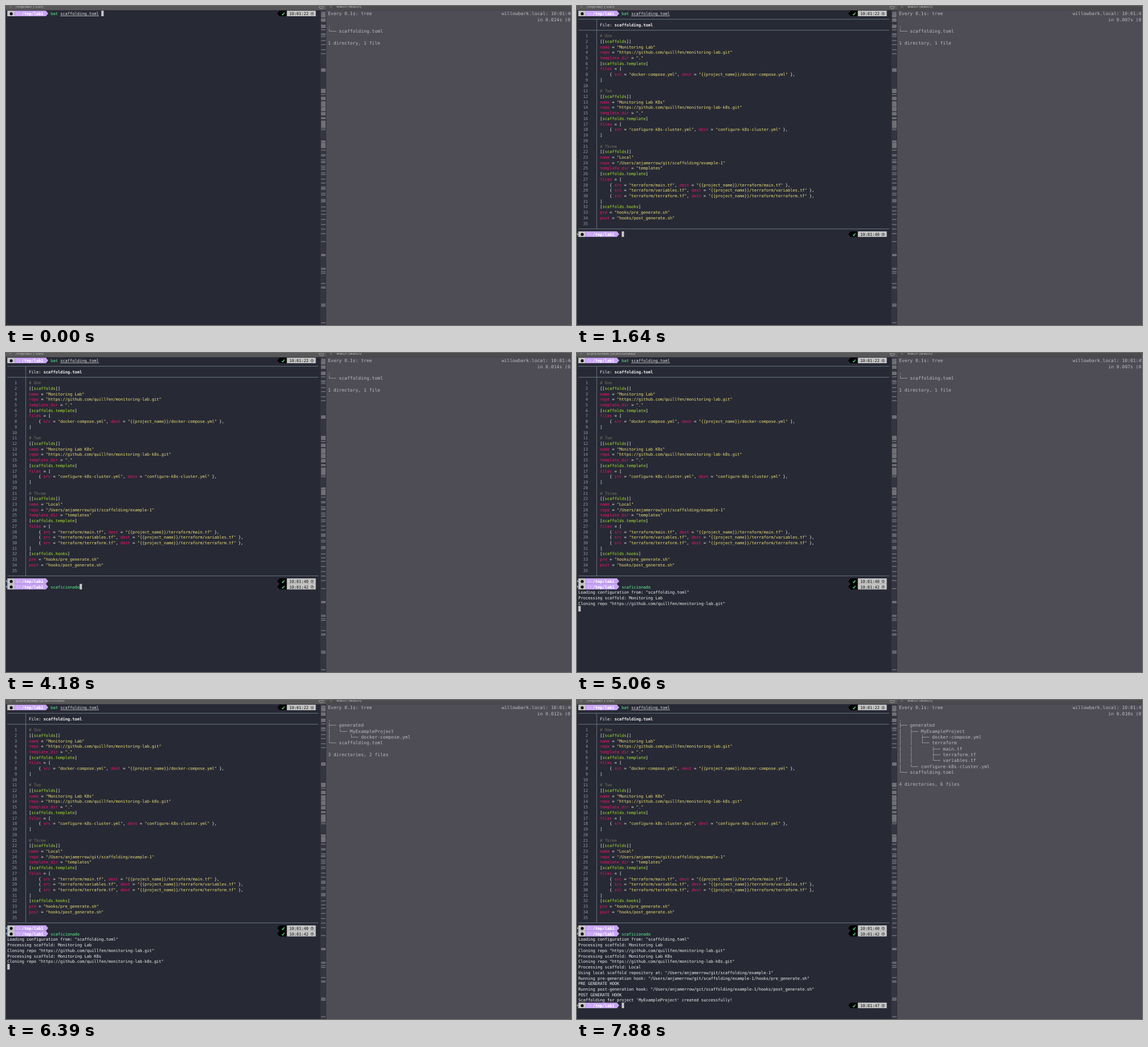
Animation of 997 by 562 pixels, one loop 8000 ms. Source, as an HTML page:

```html
<!DOCTYPE html>
<html lang="en">
<head>
<meta charset="utf-8">
<title>Scaffolding terminal</title>
<style>
html, body { margin: 0; width: 100%; height: 100%; overflow: hidden; background: #272935; }
svg { display: block; width: 997px; height: 562px; }
text { white-space: pre; text-rendering: geometricPrecision; }
.mono { font: 7.29px "DejaVu Sans Mono", monospace; letter-spacing: -.1365px; fill: #eeeeec; }
.watch { font: 7.9px "DejaVu Sans Mono", monospace; letter-spacing: .104px; }
.title { font: 6.6px Inter, sans-serif; fill: #c4c4c4; }
.bold { font-weight: bold; }
</style>
</head>
<body>
<svg viewBox="0 0 997 562">
  <rect width="997" height="562" fill="#272935"/>
  <rect x="565" width="432" height="562" fill="#4e4d55"/>
  <g id="marks"></g>
  <g id="file"></g>
  <g id="shell"></g>
  <g id="watch"></g>
  <g id="bars"></g>
</svg>
<script>
const LOOP = 8000;
const PT = .6075;                                            // one terminal point on the stage
const CW = 7 * PT, RH = 16 * PT, LEFT = 2.3, TOP = 8.28;     // left pane cells
const WW = 8 * PT, WH = 17 * PT, WLEFT = 568.2, WTOP = 8.4;  // right pane cells
const GREEN = "#5af08c", GREY = "#c6c6c6", PALE = "#bdbdc0";
const USER = "quillfen", HOME = "/Users/anjamerrow", HOST = "willowbark.local";

const at = id => document.getElementById(id);
const esc = s => s.replace(/&/g, "&amp;").replace(/</g, "&lt;");
const colX = c => LEFT + c * CW;
const rowY = r => TOP + r * RH;
const rect = (x, y, w, h, fill) => `<rect x="${x}" y="${y}" width="${w}" height="${h}" fill="${fill}"/>`;
const path = (d, attrs) => `<path d="${d}" ${attrs}/>`;
const span = (s, fill) => `<tspan fill="${fill}">${s}</tspan>`;
const raw = (c, r, body, cls = "") => `<text class="mono ${cls}" x="${colX(c)}" y="${rowY(r) + 7.95}">${body}</text>`;
const put = (c, r, s, fill = "#eeeeec", cls = "") => raw(c, r, span(esc(s), fill), cls);

const toml = `# One
[[scaffolds]]
name = "Monitoring Lab"
repo = "https://github.com/${USER}/monitoring-lab.git"
template_dir = "."
[scaffolds.template]
files = [
    { src = "docker-compose.yml", dest = "{{project_name}}/docker-compose.yml" },
]

# Two
[[scaffolds]]
name = "Monitoring Lab K8s"
repo = "https://github.com/${USER}/monitoring-lab-k8s.git"
template_dir = "."
[scaffolds.template]
files = [
    { src = "configure-k8s-cluster.yml", dest = "configure-k8s-cluster.yml" },
]

# Three
[[scaffolds]]
name = "Local"
repo = "${HOME}/git/scaffolding/example-1"
template_dir = "templates"
[scaffolds.template]
files = [
    { src = "terraform/main.tf", dest = "{{project_name}}/terraform/main.tf" },
    { src = "terraform/variables.tf", dest = "{{project_name}}/terraform/variables.tf" },
    { src = "terraform/terraform.tf", dest = "{{project_name}}/terraform/terraform.tf" },
]
[scaffolds.hooks]
pre = "hooks/pre_generate.sh"
post = "hooks/post_generate.sh"
`.split("\n");

const log = `Loading configuration from: "scaffolding.toml"
Processing scaffold: Monitoring Lab
Cloning repo "https://github.com/${USER}/monitoring-lab.git"
Processing scaffold: Monitoring Lab K8s
Cloning repo "https://github.com/${USER}/monitoring-lab-k8s.git"
Processing scaffold: Local
Using local scaffold repository at: "${HOME}/git/scaffolding/example-1"
Running pre-generation hook: "${HOME}/git/scaffolding/example-1/hooks/pre_generate.sh"
PRE GENERATE HOOK
Running post-generation hook: "${HOME}/git/scaffolding/example-1/hooks/post_generate.sh"
POST GENERATE HOOK
Scaffolding for project 'MyExampleProject' created successfully!`.split("\n");

// tree pads after a vertical bar with no-break spaces, which the diff marks too
const tree = s => s.replace(/│  /g, "│\u00a0\u00a0").split("\n");
const trees = [
  tree(`.
└── scaffolding.toml

1 directory, 1 file`),
  tree(`.
├── generated
│   └── MyExampleProject
│       └── docker-compose.yml
└── scaffolding.toml

3 directories, 2 files`),
  tree(`.
├── generated
│   ├── MyExampleProject
│   │   ├── docker-compose.yml
│   │   └── terraform
│   │       ├── main.tf
│   │       ├── terraform.tf
│   │       └── variables.tf
│   └── configure-k8s-cluster.yml
└── scaffolding.toml

4 directories, 6 files`)
];

// [time, run time of tree in ms]
const delays = [[0, 24], [150, 6], [450, 9], [600, 7], [890, 12], [1190, 8], [1490, 10], [1640, 7],
  [1790, 9], [2080, 6], [2230, 11], [2530, 8], [2830, 7], [2980, 10], [3280, 6], [3580, 9],
  [4030, 14], [4330, 8], [4620, 11], [4910, 7], [5210, 9], [5510, 10], [5660, 7], [5950, 9],
  [6100, 12], [6540, 8], [6830, 11], [7130, 9], [7430, 7], [7730, 8], [7870, 10]];
const typing = [[2530, "s"], [2830, "sc"], [2980, "sca"], [3280, "scaficionado"]];
const logSteps = [[4480, 0], [4620, 3], [5660, 5], [7130, 12]];
const treeSteps = [[0, 0], [5800, 1], [7130, 2]];
const T = { bat: 150, enter: 2080, run: 4480, done: 7130 };
const DIFF_TIME = 145;

const latest = (steps, t) => steps.filter(s => s[0] <= t).pop();

function paint(line) {
  return esc(line).replace(/("[^"]*")|(#.*)|(\[+)([\w.]+)(\]+)|(\w+)(?= =)/g,
    (m, str, note, open, table, close, key) =>
      str ? span(str, "#e6db74") :
      note ? span(note, "#75715e") :
      key ? span(key, "#f2106d") :
      open + span(table, "#a6e22e") + close);
}

function prompt(row, clock, mark = true) {
  const top = rowY(row), y = top + RH / 2, end = top + RH;
  const icon = 'fill="none" stroke="#222" stroke-width=".7"';
  let s = mark ? path(`M0 ${y - 2.5}L2.2 ${y}L0 ${y + 2.5}Z`, 'fill="#7aa8d8"') : "";
  s += rect(LEFT, top, 3 * CW, RH, GREY);
  s += path(`M${colX(3)} ${top}H${colX(16)}L${colX(17)} ${y}L${colX(16)} ${end}H${colX(3)}Z`, 'fill="#c8a5f5"');
  s += `<circle cx="9.2" cy="${y + .5}" r="2.6" fill="#111"/>`;
  s += path(`M19 ${y + 2.5}V${y - 1.5}H21L21.8 ${y - .7}H24.5V${y + 2.5}Z`, 'fill="none" stroke="#e2d0fa" stroke-width=".7"');
  s += put(6, row, "/tmp/lab1", "#fff", "bold");
  if (clock) {
    s += path(`M${colX(116)} ${top}H${colX(113)}L${colX(112)} ${y}L${colX(113)} ${end}H${colX(116)}Z`, 'fill="#000"');
    s += path(`M486.9 ${y + .9}L488.5 ${y + 2.7}L491.2 ${y - 1.5}`, `fill="none" stroke="${GREEN}" stroke-width="1.2"`);
    s += rect(colX(116), top, 12 * CW, RH, GREY);
    s += put(117, row, clock, "#111");
    s += `<circle cx="540.2" cy="${y + .5}" r="2.3" ${icon}/>`;
    s += path(`M540.2 ${y - .9}V${y + .5}H541.4`, icon);
  }
  return s;
}

const cursor = (c, r) => rect(colX(c), rowY(r), CW, RH, "#c4c4c6");

function drawMarks() {
  const blocks = [[10, 2], [12.5, 8], [22, 6], [33, 6], [110, 6], [146, 7], [160, 6], [168, 8.5],
    [178, 7], [187, 6], [196, 3], [202, 12], [237, 3], [241, 9], [437, 4]];
  const lines = [42, 49, 51, 54, 61, 68, 77, 84, 156, 215, 218, 254, 262, 264, 271, 274, 276, 282, 285, 288,
    294, 297, 305, 312, 319, 321, 323, 330, 333, 341, 343, 345, 354, 361, 367, 376, 385, 393, 401,
    415, 462, 464, 468, 471, 489, 495, 497, 525, 527, 529, 558];
  let s = rect(554.5, 0, 10, 562, "#343541");
  for (const [y, h] of blocks) {
    s += rect(556, y, 8, h, "#55555d");
    for (let i = 0; i < h; i += 2) s += rect(556, y + i, 8, 1.2, "#808085");
  }
  for (const y of lines) s += rect(556, y - .6, 8, 1.2, "#808085");
  at("marks").innerHTML = s;
}

function drawFile() {
  const rule = 'stroke="#718087" stroke-width=".9" fill="none"';
  const [top, mid, end] = [1, 3, 39].map(r => rowY(r) + 5.3);
  let s = path(`M2.3 ${top}H551M2.3 ${mid}H551M2.3 ${end}H551M34.8 ${top}V${end}`, rule);
  s += raw(9, 2, `File: <tspan class="bold">scaffolding.toml</tspan>`);
  toml.forEach((line, i) => {
    s += put(0, i + 4, String(i + 1).padStart(4), "#8f999d");
    s += raw(9, i + 4, paint(line));
  });
  at("file").innerHTML = s;
}

function shell(t) {
  let s = prompt(0, "10:01:22", false) + put(18, 0, "bat", GREEN) + put(22, 0, "scaffolding.toml", "#dededf");
  s += rect(colX(22), 17.3, 16 * CW, .7, "#dededf");
  if (t < T.bat) return s + cursor(39, 0);
  s += prompt(40, "10:01:40");
  if (t < T.enter) return s + cursor(18, 40);
  s += prompt(41, "10:01:42");

  const word = "scaficionado", typed = (latest(typing, t) || [0, ""])[1], n = typed.length;
  const whole = typed === word;
  s += put(18, 41, typed, whole ? GREEN : "#ff5c57", whole ? "" : "bold");
  if (n && !whole) s += put(18 + n, 41, word.slice(n), "#74747b");
  if (t < T.run) {
    s += cursor(18 + n, 41);
    return n && !whole ? s + put(18 + n, 41, word[n], "#55555c") : s;
  }
  const count = latest(logSteps, t)[1];
  log.slice(0, count).forEach((line, i) => s += put(0, 42 + i, line));
  return t < T.done ? s + cursor(0, 42 + count) : s + prompt(54, "10:01:47") + cursor(18, 54);
}

function watch(t) {
  const wput = (c, r, str, fill = PALE) =>
    `<text class="watch" x="${WLEFT + c * WW}" y="${WTOP + 8.05 + r * WH}" fill="${fill}">${esc(str)}</text>`;
  const second = 40 + Math.floor(t / 1000);
  const delay = String(latest(delays, t)[1]).padStart(3, "0");
  let s = wput(0, 0, "Every 0.1s: tree") + wput(63, 0, `${HOST}: 10:01:${second}`);
  s += wput(76, 1, `in 0.${delay}s (0)`);
  const [start, k] = latest(treeSteps, t);
  const fresh = k > 0 && t - start < DIFF_TIME;
  trees[k].forEach((line, i) => {
    s += wput(0, i + 2, line);
    if (!fresh) return;
    const old = trees[k - 1][i] || "";
    const width = Math.max(line.length, old.length);
    const changed = c => c < width && (line[c] || " ") !== (old[c] || " ");
    for (let c = 0; c < width; c++) {
      if (!changed(c)) continue;
      const from = c;
      while (changed(c + 1)) c++;
      s += rect(WLEFT + from * WW, WTOP + (i + 2) * WH, (c + 1 - from) * WW, WH, PALE);
      s += wput(from, i + 2, line.slice(from, c + 1), "#4a4951");
    }
  });
  return s;
}

function bars(t) {
  const busy = t >= T.run && t < T.done;
  const cross = x => path(`M${x - 2.3} -1.5L${x + 2.3} 3.3M${x + 2.3} -1.5L${x - 2.3} 3.3`, 'stroke="#929292" stroke-width=".7"');
  const title = (x, s) => `<text class="title" x="${x}" y="3.2">${s}</text>`;
  return rect(0, 0, 565, 7, "#595859") + rect(565, 0, 432, 7, "#4b4a4d") + rect(0, 7, 997, .7, "#424149") +
    cross(7.5) + cross(573.5) +
    title(17, busy ? "scaficionado (scaficionado)" : "/tmp/lab1 (-zsh)") + title(583, "watch (watch)") +
    `<circle cx="556.5" cy="1" r="4" fill="none" stroke="#aaa" stroke-width=".8"/>` +
    path("M554 1H559", 'stroke="#aaa" stroke-width=".8"');
}

const cache = {};
function update(id, markup) {
  if (cache[id] !== markup) at(id).innerHTML = cache[id] = markup;
}

function frame(now) {
  const t = now % LOOP;
  at("file").setAttribute("visibility", t < T.bat ? "hidden" : "visible");
  update("shell", shell(t));
  update("watch", watch(t));
  update("bars", bars(t));
  requestAnimationFrame(frame);
}

drawMarks();
drawFile();
frame(performance.now());
</script>
</body>
</html>
```
